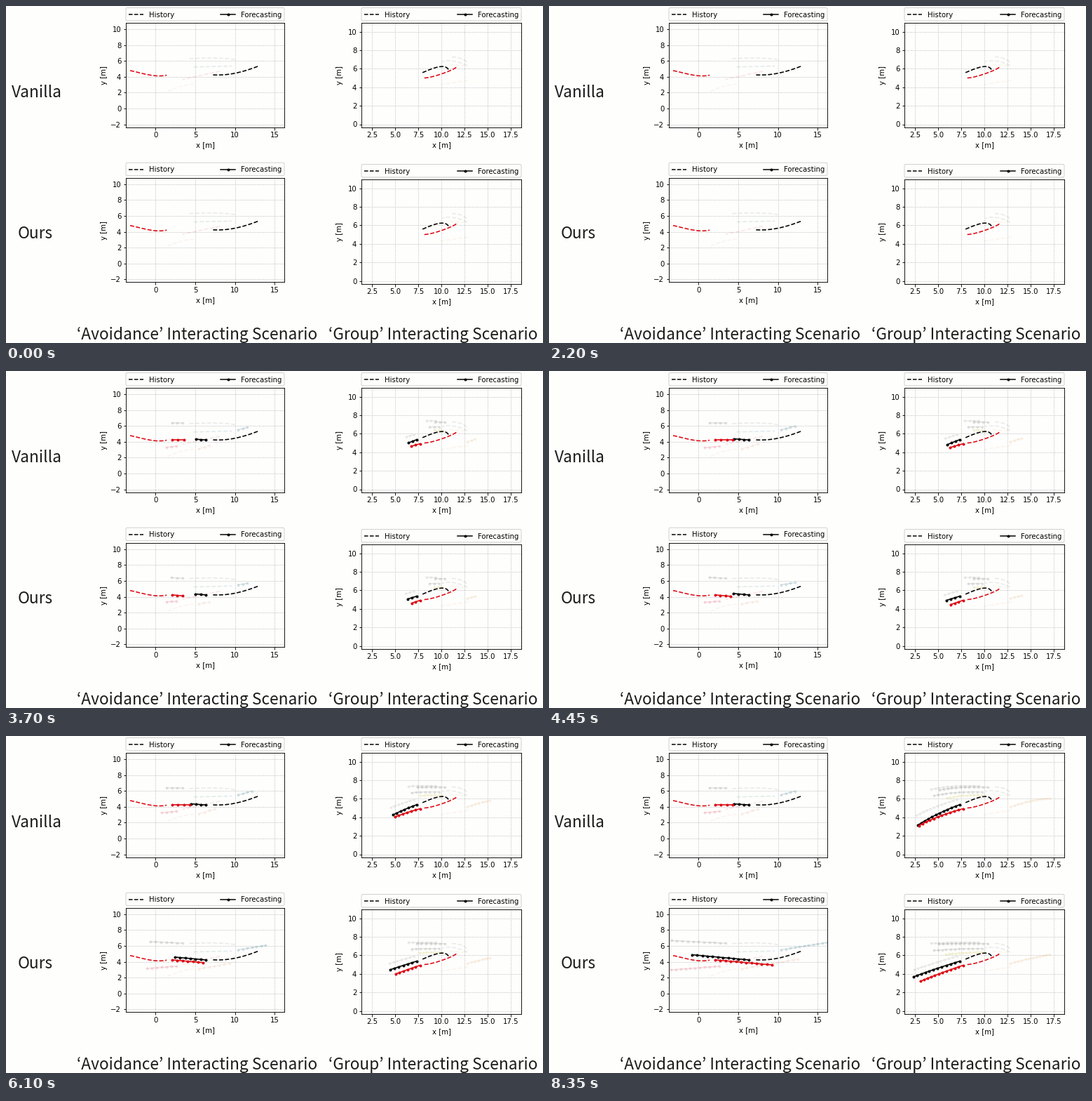
A matplotlib script for the animation above (8500 ms loop, 766 px wide and 480 px high).

```python
import numpy as np
import matplotlib.pyplot as plt
from matplotlib.animation import FuncAnimation
from matplotlib.patches import FancyBboxPatch

W, H, DPI = 766, 480, 100
PT = 72 / DPI            # points per pixel
STEP_MS = 100
FRAMES = 85
STEPS = 12               # forecast points per agent
RED, GREY, PAPER = "#dc0a14", "#5a5a5a", "#fefefd"

plt.rcParams.update({
    "font.family": "DejaVu Sans",
    "font.size": 10.1 * PT,
    "axes.linewidth": 0.9 * PT,
})

# Agent: colour, opacity, key points of the observed path,
# then forecast start, end in the upper panel, end in the lower panel.
AVOIDANCE = [
    (GREY, 0.15, [(10, 6.15), (7.6, 6.36), (4.1, 6.28)],
     (3.41, 6.33), (1.38, 6.33), (-4.1, 6.7)),
    ("#5a8a9c", 0.21, [(4.8, 5.24), (9.6, 5.35)],
     (10.38, 5.5), (12.14, 5.97), (16.7, 6.5)),
    ("#d8506a", 0.18, [(8.1, 4.7), (3.4, 3.68)],
     (2.62, 3.43), (0.77, 3.25), (-4.1, 2.93)),
    ("#e0a080", 0.13, [(1.5, 2.15), (3.2, 2.8), (4.8, 3.05)],
     (5.44, 3.1), (7.47, 3.72), (12.5, 4.33)),
    ("black", 1, [(12.85, 5.31), (10.9, 4.66), (9, 4.29), (7.03, 4.25)],
     (6.32, 4.23), (4.43, 4.37), (-0.82, 4.88)),
    (RED, 1, [(-3.2, 4.78), (-1.67, 4.42), (-0.13, 4.14), (1.4, 4.2)],
     (2.09, 4.23), (4.3, 4.23), (9.25, 3.6)),
]
GROUP = [
    (GREY, 0.15, [(12.73, 6.72), (12.05, 7.14), (10.98, 7.29)],
     (10.38, 7.25), (5.15, 6.95), (5.08, 7.21)),
    (GREY, 0.09, [], (9.4, 7.4), (4.24, 7.02), (4.24, 7.29)),
    ("#5f6660", 0.15, [(12.8, 6.34), (11.3, 6.84), (10.08, 6.76)],
     (9.77, 6.74), (4.55, 6.34), (4.55, 6.53)),
    ("#d0c040", 0.15, [(12.6, 6.3), (10.9, 6.45)],
     (10.08, 6.35), (5.98, 6.07), (5.83, 6.11)),
    (GREY, 0.08, [], (7.05, 5.9), (2.65, 4.2), (2.42, 4.44)),
    ("#e8b070", 0.15, [(9.9, 4.3), (12.95, 4.75)],
     (12.8, 5.13), (17.05, 6.04), (17.05, 6.07)),
    ("black", 1, [(10.76, 5.92), (10, 6.24), (8.9, 5.97), (7.95, 5.58)],
     (7.35, 5.37), (2.8, 3.15), (2.35, 3.68)),
    (RED, 1, [(11.6, 6.17), (10.85, 5.76), (9.4, 5.25), (8.1, 5.01)],
     (7.69, 4.92), (2.92, 3.11), (3.07, 3.19)),
]


def smooth(keys, n=40):
    """Polynomial curve through evenly timed key points."""
    at = np.linspace(0, 1, len(keys))
    t = np.linspace(0, 1, n)
    return [np.polyval(np.polyfit(at, c, len(keys) - 1), t)
            for c in np.transpose(keys)]


def forecast(start, end, n, slowing, bow):
    """Walk of n points; slowing eases the pace, bow lifts the middle."""
    t = np.linspace(0, 1, n)
    s = t + slowing * t * (1 - t)
    (x0, y0), (x1, y1) = start, end
    return x0 + (x1 - x0) * s, y0 + (y1 - y0) * s + 4 * bow * t * (1 - t)


fig = plt.figure(figsize=(W / 100, H / 100), dpi=DPI, facecolor=PAPER)
page = fig.add_axes([0, 0, 1, 1])
page.set(xlim=(0, W), ylim=(H, 0))
page.axis("off")


def legend(left, width, top):
    """Legend strip with a dashed and a dotted-line handle."""
    page.add_patch(FancyBboxPatch(
        (left, top), width, 18.4, boxstyle="round,pad=0,rounding_size=2",
        fc=PAPER, ec="#cccccc", lw=0.9 * PT))
    y = top + 9.4
    for x, label, style in ((left + 3.7, "History", "k--"),
                            (left + width - 91, "Forecasting", "k-o")):
        page.plot([x, x + 10.5, x + 21], [y] * 3, style, lw=1.5 * PT,
                  ms=4 * PT, mew=0, markevery=[1])
        page.text(x + 29.3, y + 3.7, label, va="baseline")


def panel(box, xmap, ymap, xticks, yticks):
    """Axes over a pixel box; maps hold (pixel of zero, pixels per metre)."""
    l, t, r, b = box
    ax = fig.add_axes([l / W, 1 - b / H, (r - l) / W, (b - t) / H],
                      facecolor=PAPER)
    ax.set(xlim=[(p - xmap[0]) / xmap[1] for p in (l, r)],
           ylim=[(ymap[0] - p) / ymap[1] for p in (b, t)],
           xticks=xticks, yticks=yticks)
    ax.tick_params(length=3.5 * PT, width=0.9 * PT, pad=3.2 * PT)
    ax.grid(ls=":", lw=0.9 * PT, color="#b0b0b0")
    ax.set_axisbelow(True)
    page.text((l + r) / 2, b + 25.7, "x [m]", ha="center", va="center")
    page.text(l - 31, (t + b) / 2, "y [m]", ha="center", va="center",
              rotation=90)
    return ax


def populate(ax, agents, lower, n, slowing, bow):
    """Draw observed paths; return forecast lines with their full paths."""
    out = []
    for color, alpha, seen, start, *ends in agents:
        style = dict(color=color, lw=1.6 * PT)
        if seen:
            ax.plot(*smooth(seen), "--", alpha=alpha if alpha == 1 else 0.8 * alpha,
                    **style)
        line, = ax.plot([], [], "-o", ms=4 * PT, mew=0, alpha=alpha, **style)
        out.append((line, forecast(start, ends[lower], n, slowing, bow)))
    return out


LEFT = (213.3, 11.34), [0, 5, 10, 15], range(-2, 11, 2)
RIGHT = (489, 13.2), np.arange(2.5, 18, 2.5), range(0, 11, 2)

lines = []
for lower, dy_left, dy_right in ((0, 0, 0), (1, 220.7, 223)):
    xmap, xticks, yticks = LEFT
    ax = panel((171, 24.4 + dy_left, 397.4, 172.7 + dy_left), xmap,
               (146 + dy_left, 11.3), xticks, yticks)
    # In the upper panel the walkers meet and halt after four points.
    lines += populate(ax, AVOIDANCE, lower, STEPS if lower else 4, 0, 0)
    legend(171, 226, 2.5 + dy_left)

    xmap, xticks, yticks = RIGHT
    ax = panel((507, 24.4 + dy_right, 735.4, 172.7 + dy_right), xmap,
               (168.5 + dy_right, 13.18), xticks, yticks)
    lines += populate(ax, GROUP, lower, STEPS, 0.1, 0.05 if lower else 0.15)
    legend(507, 228, 2.5 + dy_right)

for x, y, label in (
    (7.5, 130, "Vanilla"),
    (17, 331, "Ours"),
    (101, 475, "‘Avoidance’ Interacting Scenario"),
    (460, 475, "‘Group’ Interacting Scenario"),
):
    page.text(x, y, label, family="Noto Sans CJK JP", weight="light",
              size=22.75 * PT, color="#1c1c1c", va="baseline")


def update(i):
    # One more forecast point every half second, from 2.7 s on.
    n = int(np.clip((i - 22) // 5, 0, STEPS))
    for line, (x, y) in lines:
        line.set_data(x[:n], y[:n])
    return [line for line, _ in lines]


anim = FuncAnimation(fig, update, frames=FRAMES, interval=STEP_MS,
                     init_func=lambda: update(0), repeat=True, repeat_delay=0)
plt.show()
```
